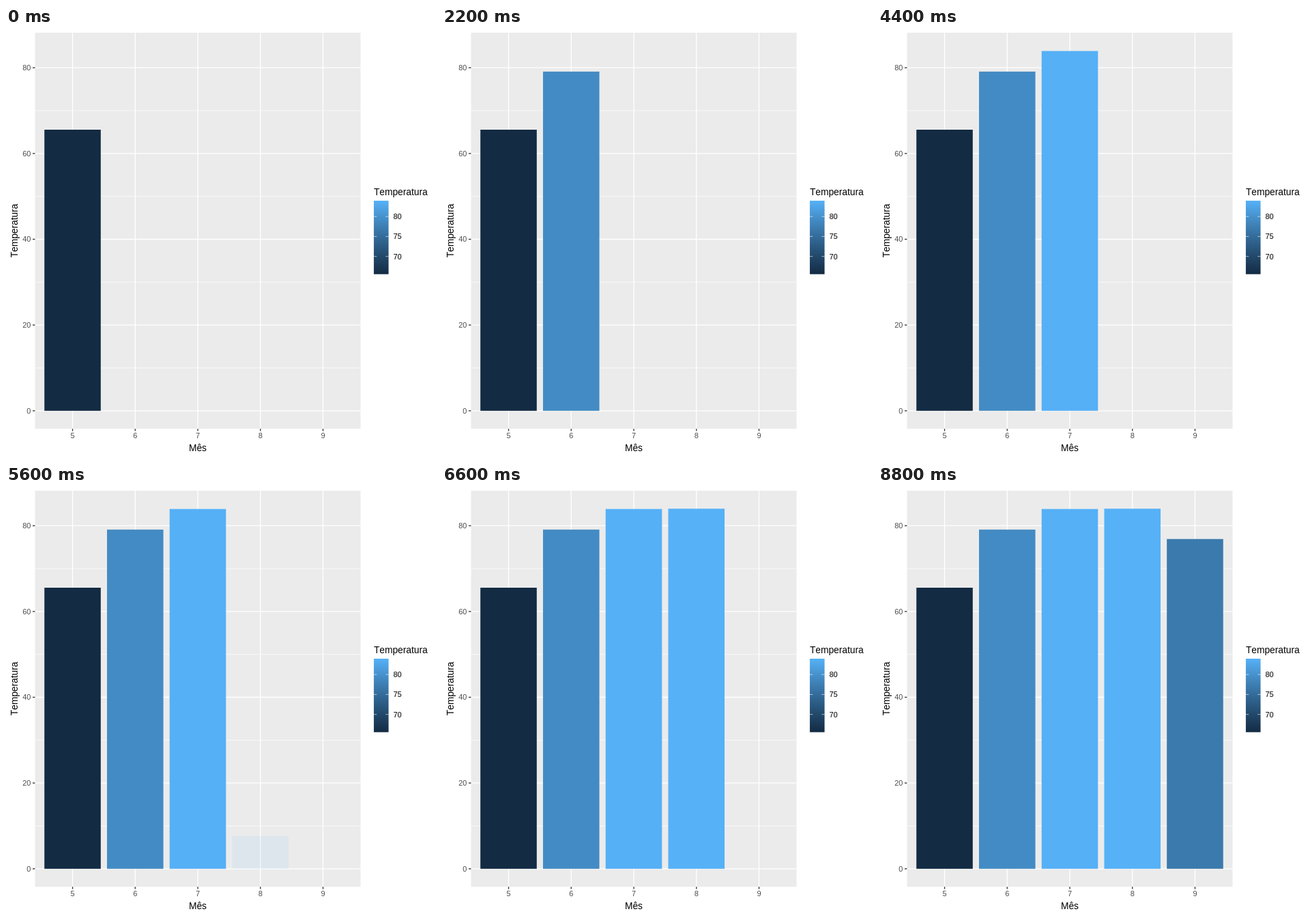
Write an HTML page that moves like this. It is 630x630 px and loops after 10000 ms.

```html
<!DOCTYPE html>
<html lang="pt">
<head>
<meta charset="utf-8">
<style>
  html, body { margin: 0; width: 100%; height: 100%; overflow: hidden; background: #fff; }
  svg { display: block; width: 630px; height: 630px; }
  text { font: 11px "Liberation Sans", Arial, sans-serif; font-kerning: none; }
  .title { font-size: 13.75px; }
  .axis { fill: #4d4d4d; }
</style>
</head>
<body>
<svg id="chart" viewBox="0 0 630 630">
  <defs><linearGradient id="ramp" x1="0" y1="1" x2="0" y2="0"></linearGradient></defs>
</svg>
<script>
const svg = document.getElementById('chart');
const temps = [65.548, 79.1, 83.903, 83.968, 76.9];
const [low, , , high] = temps;
const left = 42.5, right = 519.5, top_ = 6.9, bottom = 587.2;
const step = (right - left) / 5.2;
const unit = (bottom - top_) / (high * 1.1);
const xAt = i => left + step * (i + 0.6);
const yAt = v => bottom - unit * (v + high * 0.05);

function add(tag, attrs, parent = svg) {
  const el = document.createElementNS('http://www.w3.org/2000/svg', tag);
  for (const key in attrs) el.setAttribute(key, attrs[key]);
  return parent.appendChild(el);
}
const line = (x1, y1, x2, y2, stroke, width) =>
  add('line', { x1, y1, x2, y2, stroke, 'stroke-width': width });
const rect = (x, y, width, height, fill) => add('rect', { x, y, width, height, fill });
function label(str, x, y, anchor, attrs) {
  add('text', { x, y, 'text-anchor': anchor, ...attrs }).textContent = str;
}
const shade = t => `color-mix(in lab, #56b1f7 ${t * 100}%, #132b43)`;

// Panel and grid
rect(left, top_, right - left, bottom - top_, '#ebebeb');
for (let v = 10; v < 80; v += 20) line(left, yAt(v), right, yAt(v), '#fff', 0.67);
for (let v = 0; v <= 80; v += 20) line(left, yAt(v), right, yAt(v), '#fff', 1.33);
temps.forEach((_, i) => line(xAt(i), top_, xAt(i), bottom, '#fff', 1.33));

const bars = temps.map((v, i) => {
  const bar = rect(xAt(i) - step * 0.45, yAt(v), step * 0.9, v * unit, 'none');
  bar.style.fill = shade((v - low) / (high - low));
  return bar;
});

// Axes
for (let v = 0; v <= 80; v += 20) {
  line(left - 3.4, yAt(v), left, yAt(v), '#333', 1.33);
  label(v, 36.4, yAt(v) + 3.95, 'end', { class: 'axis' });
}
temps.forEach((_, i) => {
  line(xAt(i), bottom, xAt(i), bottom + 3.4, '#333', 1.33);
  label(i + 5, xAt(i), 601.3, 'middle', { class: 'axis' });
});
label('Mês', (left + right) / 2, 620, 'middle', { class: 'title' });
label('Temperatura', 0, 0, 'middle', { class: 'title', transform: 'translate(17 297) rotate(-90)' });

// Legend
const key = { x: 538.9, y: 253, w: 21.6, h: 107.7 };
for (let i = 0; i <= 10; i++) {
  add('stop', { offset: i / 10 }, document.getElementById('ramp')).style.stopColor = shade(i / 10);
}
rect(key.x, key.y, key.w, key.h, 'url(#ramp)');
label('Temperatura', key.x, 245, 'start', { class: 'title' });
for (const v of [70, 75, 80]) {
  const y = key.y + key.h * (high - v) / (high - low);
  line(key.x, y, key.x + key.w / 5, y, '#fff', 0.6);
  line(key.x + key.w * 0.8, y, key.x + key.w, y, '#fff', 0.6);
  label(v, 567.4, y + 3.95, 'start');
}

// Each bar grows and fades in over 11 ticks of 100 ms, one bar every 2200 ms
function draw(now) {
  const tick = Math.floor(now % 10000 / 100);
  bars.forEach((bar, i) => {
    const p = i ? Math.min(1, Math.max(0, (tick - 22 * i + 11) / 11)) : 1;
    bar.setAttribute('y', yAt(temps[i] * p));
    bar.setAttribute('height', temps[i] * p * unit);
    bar.setAttribute('opacity', p);
  });
}
const start = performance.now();
function loop() {
  draw(performance.now() - start);
  requestAnimationFrame(loop);
}
loop();
</script>
</body>
</html>
```
